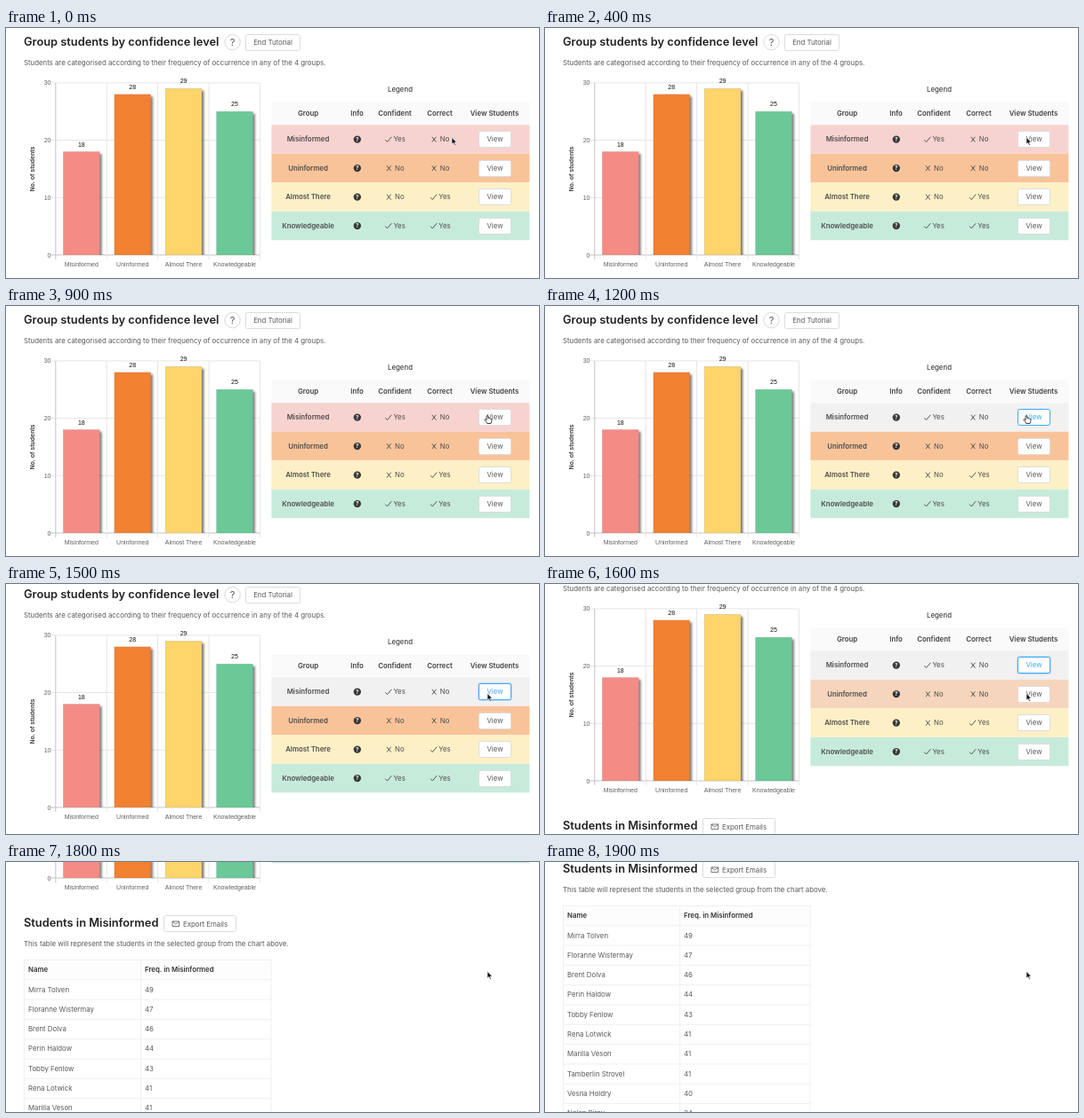
Write an HTML page that moves like this. It is 599 by 282 pixels and loops after 2700 ms.

```html
<!DOCTYPE html>
<html lang="en">
<head>
<meta charset="utf-8">
<title>Confidence groups</title>
<style>
  html, body { margin: 0; width: 100%; height: 100%; overflow: hidden; background: #fff; }
  svg { display: block; width: 599px; height: 282px; }
  text { font-family: Inter, "Open Sans", sans-serif; white-space: pre; }
  .chart text { font-family: "Liberation Sans", Arial, sans-serif; }
</style>
</head>
<body>
<svg id="stage" viewBox="0 0 599 282">
  <defs>
    <filter id="shadow" x="-20%" y="-10%" width="140%" height="120%">
      <feDropShadow dx="2.4" dy="2.4" stdDeviation="1.1" flood-color="#000" flood-opacity="0.5"/>
    </filter>
    <clipPath id="plot"><rect x="50" y="50" width="240" height="206"/></clipPath>
  </defs>
  <g id="page"></g>
  <g id="cursor">
    <path id="arrow" d="M0 0V7.6L1.8 6L3 8.8L4.3 8.2L3.1 5.5H5.5Z"
      fill="#111" stroke="#fff" stroke-width="0.6" stroke-linejoin="round"/>
    <path id="hand" d="M-.9 .6Q0-.6 .9 .6V3.1Q1.7 2.5 2.3 3.3Q3.1 2.8 3.6 3.6Q4.7 3.3 4.9 4.4V6.3L4 9H-.2L-1.4 6.8L-3.2 4.9Q-2.9 3.7-1.8 4.4L-.9 5.2Z"
      fill="#fff" stroke="#111" stroke-width="0.8" stroke-linejoin="round"/>
  </g>
</svg>
<script>
const LOOP = 2700, STEP = 100, LAST = 1900;
const SCROLL_START = 1404, SCROLL_TIME = 656, SCROLL_END = 317.5;
const $ = id => document.getElementById(id);
const page = $('page');

function add(parent, tag, attrs, content = '') {
  const el = document.createElementNS('http://www.w3.org/2000/svg', tag);
  for (const key in attrs) el.setAttribute(key, attrs[key]);
  el.textContent = content;
  parent.append(el);
  return el;
}

// cy is the middle of the capital letters
function label(parent, x, cy, content, { size = 7.82, weight = 400, fill = '#595959', anchor = 'start' } = {}) {
  return add(parent, 'text', {
    x, y: cy + size * 0.36, fill, 'font-size': size, 'font-weight': weight, 'text-anchor': anchor
  }, content);
}

const rect = (parent, x, y, width, height, fill, more = {}) =>
  add(parent, 'rect', { x, y, width, height, fill, ...more });
const line = (parent, d, stroke, more = {}) =>
  add(parent, 'path', { d, stroke, fill: 'none', ...more });
const box = (x, y, w, h) => rect(page, x, y, w, h, '#fff', { rx: 2, stroke: '#dcdcdc' });

const heading = { size: 12.82, weight: 600, fill: '#222' };
const strong = { weight: 600, fill: '#404040' };
const centred = { anchor: 'middle' };

const groups = [
  { name: 'Misinformed', count: 18, bar: '#f48c85', row: [247, 211, 208], confident: true, correct: false },
  { name: 'Uninformed', count: 28, bar: '#f28132', row: [249, 195, 154], confident: false, correct: false },
  { name: 'Almost There', count: 29, bar: '#fdd56a', row: [253, 240, 198], confident: false, correct: true },
  { name: 'Knowledgeable', count: 25, bar: '#6ac997', row: [199, 235, 219], confident: true, correct: true }
];

function drawHeader() {
  label(page, 20, 15, 'Group students by confidence level', heading);
  add(page, 'circle', { cx: 254.5, cy: 16, r: 8.7, fill: '#fff', stroke: '#d9d9d9' });
  label(page, 254.5, 16, '?', { size: 11, anchor: 'middle' });
  box(269.5, 7.5, 61, 18);
  label(page, 300, 16.5, 'End Tutorial', centred);
  label(page, 20, 39, 'Students are categorised according to their frequency of occurrence in any of the 4 groups.');
}

function drawChart() {
  const chart = add(page, 'g', { class: 'chart' });
  const left = 55.8, base = 256, unit = 6.47, slot = 57.4;
  const small = { size: 7, fill: '#606060' };
  for (let v = 0; v <= 30; v += 10) {
    const y = base - v * unit;
    line(chart, `M50 ${y}H285.4`, v ? '#e6e6e6' : '#c4c4c4');
    label(chart, 50.5, y, v, { ...small, anchor: 'end' });
  }
  for (let i = 0; i <= 4; i++) {
    line(chart, `M${left + i * slot} 62V261`, i ? '#e6e6e6' : '#c4c4c4');
  }
  const bars = add(chart, 'g', { 'clip-path': 'url(#plot)' });
  groups.forEach(({ name, count, bar }, i) => {
    const mid = left + (i + 0.5) * slot + 0.3, height = count * unit;
    rect(bars, mid - 20.4, base - height, 40.8, height, bar, {
      filter: 'url(#shadow)', stroke: '#000', 'stroke-opacity': 0.15, 'stroke-width': 0.6
    });
    label(chart, mid, 247.6 - height, count, { size: 7, fill: '#111', anchor: 'middle' });
    label(chart, mid, 266, name, { ...small, anchor: 'middle' });
  });
  const axis = label(chart, 0, 0, 'No. of students', { size: 7, weight: 700, fill: '#404040', anchor: 'middle' });
  axis.setAttribute('transform', 'translate(29.7 159) rotate(-90)');
}

function drawAnswer(mid, cy, yes) {
  const mark = yes
    ? `M${mid - 10.8} ${cy + 0.6}l2.3 2.3l4.8-5.7`
    : `M${mid - 9} ${cy - 2.8}l4.6 5.8m0-5.8l-4.6 5.8`;
  line(page, mark, '#444', { 'stroke-width': 0.9 });
  label(page, mid + (yes ? -1.6 : 0), cy, yes ? 'Yes' : 'No', { fill: '#4d4d4d' });
}

function drawLegend() {
  const left = 298.4, width = 290;
  label(page, 443, 69.5, 'Legend', { weight: 500, fill: '#404040', anchor: 'middle' });
  rect(page, left, 83, width, 26, '#fafafa');
  [['Group', 339.5], ['Info', 394.5], ['Confident', 437], ['Correct', 487.5], ['View Students', 549]]
    .forEach(([name, x]) => label(page, x, 96, name, { ...strong, ...centred }));
  groups.forEach((g, i) => {
    const top = 109.3 + i * 32.5, cy = top + 16.3;
    g.band = rect(page, left, top, width, 32.5, '#fff');
    label(page, 339.5, cy, g.name, { weight: 600, fill: '#4d4d4d', anchor: 'middle' });
    add(page, 'circle', { cx: 394.8, cy, r: 4.2, fill: '#383838' });
    label(page, 394.8, cy, '?', { size: 6.2, weight: 700, fill: '#fff', anchor: 'middle' });
    drawAnswer(437, cy, g.confident);
    drawAnswer(487.8, cy, g.correct);
    const y = Math.round(cy - 9.6) + 0.5;
    if (!i) g.glow = rect(page, 530.3, y - 1.2, 38.4, 20.4, '#1890ff', { rx: 3 });
    g.button = box(531.5, y, 36, 18);
    g.view = label(page, 549.5, cy, 'View', centred);
  });
}

function drawStudents() {
  const top = 348, pitch = 22.3;
  const students = [
    ['Mirra Tolven', 49], ['Floranne Wistermay', 47], ['Brent Dolva', 46], ['Perin Haldow', 44],
    ['Tobby Fenlow', 43], ['Rena Lotwick', 41], ['Marilla Veson', 41], ['Tamberlin Strovel', 41],
    ['Vesna Holdry', 40], ['Nolan Pirey', 34]
  ];
  label(page, 20, 306, 'Students in Misinformed', heading);
  box(177.5, 298.5, 81, 18);
  line(page, 'M187 305h7.6v5.6h-7.6zl3.8 3.2l3.8-3.2', '#555', { 'stroke-width': 0.8 });
  label(page, 199, 308, 'Export Emails');
  label(page, 20, 330, 'This table will represent the students in the selected group from the chart above.');

  rect(page, 20, top, 278, pitch, '#fdfdfd');
  [['Name', 'Freq. in Misinformed'], ...students].forEach(([name, freq], i) => {
    const y = top + i * pitch, style = i ? {} : { weight: 600, fill: '#333' };
    line(page, `M20 ${y + 0.5}H298.5`, '#f0f0f0');
    label(page, 25, y + 11.4, name, style);
    label(page, 156, y + 11.4, freq, style);
  });
  for (const x of [20.5, 151.5, 298]) line(page, `M${x} ${top}V600`, '#f0f0f0');
}

// Linear interpolation through [time, value] points
function track(t, points) {
  const next = points.findIndex(p => p[0] > t);
  if (next === 0) return points[0][1];
  if (next < 0) return points[points.length - 1][1];
  const [t0, a] = points[next - 1], [t1, b] = points[next];
  return a + (b - a) * (t - t0) / (t1 - t0);
}

const mix = (from, to, k) => `rgb(${from.map((c, i) => Math.round(c + (to[i] - c) * k))})`;
const easeInOut = k => k < 0.5 ? 4 * k ** 3 : 1 - 4 * (1 - k) ** 3;

const rowHover = [
  [[1000, 0], [1200, 1], [1600, 1], [1700, 0.5], [1800, 0]],
  [[1500, 0], [1600, 0.4], [1700, 0.2], [1800, 0]]
];
const buttonText = [[1000, 0], [1200, 1]];
const buttonBorder = [[1000, 0], [1200, 1], [1600, 1], [1700, 0.6]];
const buttonGlow = [[1200, 0], [1400, 0.3], [1600, 0.3], [1700, 0.08]];
const cursorX = [[0, 501], [100, 513], [200, 529], [300, 538], [400, 541]];

function draw(t) {
  const k = Math.min(1, Math.max(0, (t - SCROLL_START) / SCROLL_TIME));
  page.setAttribute('transform', `translate(0 ${-Math.round(SCROLL_END * easeInOut(k))})`);

  groups.forEach((g, i) => {
    const hover = rowHover[i] ? track(t, rowHover[i]) : 0;
    g.band.setAttribute('fill', mix(g.row, [241, 241, 241], hover));
  });
  const { glow, button, view } = groups[0], blue = [64, 169, 255];
  button.setAttribute('stroke', mix([220, 220, 220], blue, track(t, buttonBorder)));
  view.setAttribute('fill', mix([89, 89, 89], blue, track(t, buttonText)));
  glow.setAttribute('opacity', track(t, buttonGlow));

  const pointing = t >= 600 && t < 1400;
  $('hand').style.display = pointing ? '' : 'none';
  $('arrow').style.display = pointing ? 'none' : '';
  $('cursor').setAttribute('transform', `translate(${track(t, cursorX)} 123.5)`);
}

function tick() {
  const t = performance.now() % LOOP;
  draw(Math.min(LAST, Math.floor(t / STEP) * STEP));
  requestAnimationFrame(tick);
}

drawHeader();
drawChart();
drawLegend();
drawStudents();
tick();
</script>
</body>
</html>
```
